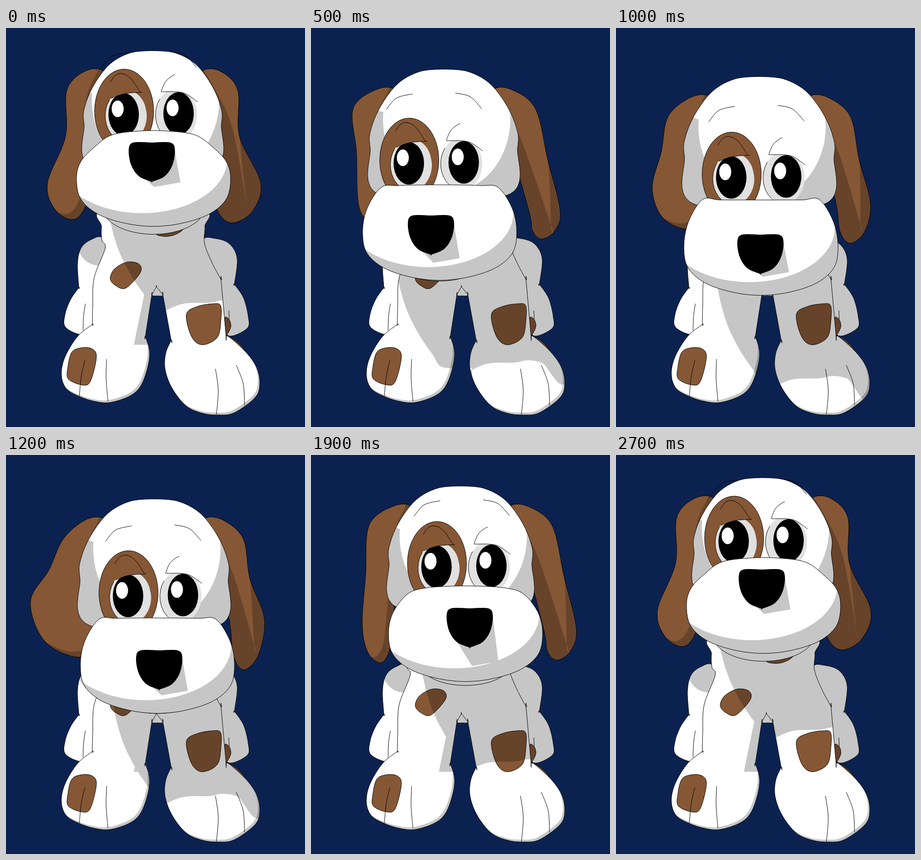
Animation of 648x864 px, one loop 3 s. Source, as an HTML page with a canvas:

```html
<!DOCTYPE html>
<html lang="en">
<head>
<meta charset="utf-8">
<title>Puppy</title>
<style>
html, body { margin: 0; width: 100%; height: 100%; overflow: hidden; background: #0b2250; }
canvas { display: block; }
</style>
</head>
<body>
<canvas width="648" height="864"></canvas>
<script>
const ctx = document.querySelector('canvas').getContext('2d');
const NIGHT = '#0b2250', WHITE = '#fff', GRAY = '#c6c6c6', BROWN = '#855735', DARK = '#67432a';
const SHADE = 'rgba(0,0,0,.224)';

const mix = (a, b, t) => a.map((v, i) => v + (b[i] - v) * t);

// Linear blend between the two keys around the step
function at(keys, step) {
  const times = Object.keys(keys).map(Number);
  const next = times.find(t => t >= step) ?? times[times.length - 1];
  const prev = times.filter(t => t < step).pop() ?? next;
  return next === prev ? keys[next] : mix(keys[prev], keys[next], (step - prev) / (next - prev));
}

// Catmull-Rom curve through [x, y] points; a doubled point makes a corner
function curve(points, closed = true) {
  const n = points.length, path = new Path2D();
  const pt = i => points[closed ? (i + n) % n : Math.max(0, Math.min(n - 1, i))];
  path.moveTo(...points[0]);
  for (let i = 0; i < (closed ? n : n - 1); i++) {
    const [a, b, c, d] = [pt(i - 1), pt(i), pt(i + 1), pt(i + 2)];
    path.bezierCurveTo(b[0] + (c[0] - a[0]) / 6, b[1] + (c[1] - a[1]) / 6,
      c[0] - (d[0] - b[0]) / 6, c[1] - (d[1] - b[1]) / 6, ...c);
  }
  return path;
}
const pts = text => text.split(' ').map(p => p.split(',').map(Number));
const mirrored = half => [...half, ...half.map(([x, y]) => [-x, y]).reverse()];
const shifted = (points, dx, dy) => points.map(([x, y]) => [x + dx, y + dy]);

function ellipse(x, y, rx, ry) {
  const path = new Path2D();
  path.ellipse(x, y, rx, ry, 0, 0, 2 * Math.PI);
  return path;
}
function outside(path, dx, dy) {
  const rest = new Path2D();
  rest.rect(0, 0, 648, 864);
  rest.addPath(path, new DOMMatrix([1, 0, 0, 1, dx, dy]));
  return rest;
}
function fill(path, color, rule) {
  ctx.fillStyle = color;
  ctx.fill(path, rule);
}
function within(path, draw) {
  ctx.save();
  ctx.clip(path);
  draw();
  ctx.restore();
}
function moved(dx, dy, draw) {
  ctx.save();
  ctx.translate(dx, dy);
  draw();
  ctx.restore();
}
function shape(path, color, inside) {
  fill(path, color);
  if (inside) within(path, inside);
  ctx.stroke(path);
}
const line = points => ctx.stroke(curve(points, false));

// Body
const rearLeft = curve(pts('210,455 185,458 163,476 155,510 158,562 158,562 140,588 128,620 129,648 165,664 187,645 240,500'));
const rearRight = curve(pts('425,460 455,456 485,468 501,500 495,555 495,555 515,585 525,625 523,650 485,667 470,640 420,520'));
const body = curve(pts('214,395 207,430 208,460 215,477 191,541 188,600 187,642 187,642 155,668 128,712 120,750 130,780 157,797 ' +
  '190,808 225,811 268,797 292,775 307,735 311,700 302,668 302,668 316,578 316,578 326,560 326,560 340,578 340,578 ' +
  '358,676 358,676 346,705 345,740 360,780 390,818 425,834 460,838 495,833 540,800 550,770 543,735 520,702 485,670 ' +
  '477,668 477,668 466,545 466,545 445,505 430,465 431,430 424,395'));
const bodySpots = [
  '226,543 235,522 262,507 288,511 291,530 260,563 238,558',
  '391,620 415,603 450,597 465,601 466,630 458,670 425,686 402,668',
  '134,735 142,703 160,693 185,694 196,712 183,765 165,773 135,760'
].map(s => curve(pts(s)));
const sideSpots = ['474,628 484,632 487,648 476,665', '486,670 502,680 517,698 500,690'].map(s => curve(pts(s)));
const chinSpot = curve(pts('325,443 340,451 362,449 382,438 390,420 350,412'));
const belly = curve(pts('314,560 316,578 328,580 341,578 341,560'));
const toes = ['171,720 163,755 159,797', '218,717 217,760 221,808', '454,738 460,785 456,837', '499,730 514,770 517,817'].map(pts);
const rearToes = ['172,597 168,625 167,655', '483,612 484,640'].map(pts);
const chestEdge = pts('222,330 222,395 240,470 268,530 300,578 322,605');
const pawEdge = pts('325,625 344,613 385,597 440,595 470,590 500,595 560,615');

// The shadow of the head slides down the chest and legs as the nose sinks
function headShadow(noseX, noseY) {
  const drop = .82 * noseY;
  const chest = shifted(chestEdge, .65 * noseX, drop);
  const shadow = curve([...chest, [345, 605 + drop], [345, 605 + drop], [345, 300], [345, 300]]);
  shadow.addPath(curve([...shifted(pawEdge, 0, drop), [580, 300], [325, 300], [325, 300]]));
  shadow.addPath(new Path2D('M300 575L277 686L318 686L330 575Z'));
  return shadow;
}

function drawBody(noseX, noseY) {
  shape(rearLeft, WHITE, () => fill(ellipse(200, 462, 46, 52), SHADE));
  shape(rearRight, GRAY);
  rearToes.forEach(line);
  sideSpots.forEach(s => shape(s, DARK));
  shape(belly, GRAY);
  shape(body, WHITE, () => {
    bodySpots.forEach(s => shape(s, BROWN));
    fill(headShadow(noseX, noseY), SHADE);
    const ground = new Path2D();
    ground.rect(0, 690, 648, 174);
    within(ground, () => fill(outside(body, -4, -5), SHADE, 'evenodd'));
  });
  toes.forEach(line);
  shape(chinSpot, DARK);
}

// Ears: x, y of the outermost point, x, y of the lowest point, inward bend
const leftRest = [90, 335, 143, 415, 24], rightRest = [552, 335, 490, 422, 28];
const leftEar = {
  0: leftRest, 5: [101, 365, 140, 424, 3], 8: [104, 375, 148, 433, 0], 12: [53, 318, 160, 438, 5],
  16: [70, 400, 108, 468, 5], 19: [111, 365, 150, 450, 0], 27: leftRest
};
const rightEar = {
  0: rightRest, 5: [540, 395, 500, 457, 0], 8: [543, 405, 500, 467, -5], 12: [560, 355, 515, 465, 11],
  16: [533, 380, 495, 463, 0], 19: [575, 375, 533, 444, 0], 21: [597, 350, 560, 415, 10], 24: rightRest
};

function drawEar(side, x, y, [outX, outY, lowX, lowY, bend]) {
  const near = (dx, dy) => [x + side * dx, y + dy];
  const out = [outX, outY], low = [lowX, lowY], inn = [lowX - .7 * (outX - lowX), outY];
  const round = p => [p[0] + .29 * (lowX - p[0]), p[1] + .71 * (lowY - p[1])];
  const shoulder = near(198 - bend / 2, 85);
  const middle = mix(near(198, 85), out, .5);
  middle[0] -= side * bend;
  const top = near(143, 43);
  const ear = curve([near(105, 50), top, shoulder, middle, out, round(out), low, round(inn), inn, near(130, 120)]);
  if (side < 0) {
    shape(ear, BROWN, () => fill(outside(ear, -14, -12), SHADE, 'evenodd'));
  } else {
    const tip = mix(out, low, .5);
    const light = curve([near(105, 30), top, shoulder, middle, tip, tip, near(172, 165), near(130, 75)]);
    shape(ear, DARK, () => fill(light, BROWN));
  }
}

// Head parts, laid out for the level pose
const skullHalf = pts('0,0 50,5 95,29 130,73 152,122 155,165 132,265');
const nose = curve(shifted(mirrored(pts('0,0 40,0 50,15 45,48 28,73 0,85')), 344, 332));
const eyes = [
  { x: 272, y: 242, white: 5, lid: pts('222,228 245,207 275,197 312,194') },
  { x: 391, y: 240, white: -5, lid: pts('340,194 354,193 400,195 432,215') }
];
const brows = ['243,172 255,157 270,154 288,165 308,194', '353,193 362,172 375,160 383,156'].map(pts);
const forehead = ['223,133 245,108 280,99', '373,97 405,105 430,131'].map(pts);

function drawEye({ x, y, white, lid }) {
  const open = curve(lid, false);
  open.lineTo(x + 70, y + 90);
  open.lineTo(x - 70, y + 90);
  within(open, () => {
    fill(ellipse(x + white, y + 3, 45, 56), '#e1e1e1');
    fill(ellipse(x, y, 33, 46), '#000');
    ctx.beginPath();
    ctx.ellipse(x + white, y + 3, 45, 56, 0, 2.2, 3.8);
    ctx.stroke();
  });
  line(lid.slice(1));
  fill(ellipse(x - 13, y - 12, 13, 18), WHITE);
}

// A raised muzzle shows a domed top, a lowered one a flat top
function drawMuzzle(tilt) {
  const dome = 18 - 22 * tilt;
  const muzzle = curve(mirrored([[30, 0], [90, dome * .25], [127, dome], [158, 50 + dome / 2],
    [167, 105], [156, 150], [112, 184], [37, 204]]));
  shape(ellipse(0, 165, 100 - 15 * tilt, 50 - 12 * tilt), GRAY);
  shape(muzzle, GRAY, () => fill(ellipse(-25, 60, 185, 118), WHITE));
  return muzzle;
}

// Skull offset, then how far the nose swings beyond it
const pose = {
  0: [-6, -18, -22, -66], 5: [-36, 22, -48, 52], 8: [-24, 48, -26, 92], 12: [-3, 28, -9, 63],
  16: [-1, 12, -3, 32], 19: [0, 0, 0, 0], 24: [-6, -18, -22, -66]
};

function drawHead(step, dx, dy, turnX, turnY) {
  const tilt = turnY / 92, size = 1 + .055 * tilt;
  const turned = (kx, ky, draw) => moved(dx + kx * turnX, dy + ky * turnY, draw);
  drawEar(-1, 324 + dx, 67 + dy, at(leftEar, step));
  drawEar(1, 324 + dx, 67 + dy, at(rightEar, step));

  const skull = curve(shifted(mirrored(skullHalf.map(p => p.map(v => v * size))), 324 + dx, 67 + dy));
  shape(skull, WHITE, () => {
    fill(outside(ellipse(330, 175, 138, 160), dx, dy), SHADE, 'evenodd');
    fill(ellipse(300 + dx, 100 + dy, 180, 75), WHITE);
    turned(.5, .56, () => shape(ellipse(273, 235, 64, 91), BROWN));
  });
  turned(.5, .56, () => {
    eyes.forEach(drawEye);
    brows.forEach(line);
  });
  turned(.5, .42, () => forehead.forEach(line));

  let muzzle;
  const muzzleX = 335 + dx + .42 * turnX, muzzleY = 284 + dy + .65 * turnY;
  moved(muzzleX, muzzleY, () => { muzzle = drawMuzzle(tilt); });
  const placed = new Path2D();
  placed.addPath(muzzle, new DOMMatrix([1, 0, 0, 1, muzzleX, muzzleY]));
  const reach = 332 + 125 - 40 * Math.abs(tilt);
  within(placed, () => turned(1, 1, () =>
    fill(new Path2D(`M394 350L406 ${reach - 10}L349 ${reach}L309 392Z`), GRAY)));
  turned(1, 1, () => fill(nose, '#000'));
}

function frame(now) {
  const step = Math.min(27, Math.floor(now % 3000 / 100));
  const [dx, dy, turnX, turnY] = at(pose, step);
  ctx.fillStyle = NIGHT;
  ctx.fillRect(0, 0, 648, 864);
  ctx.strokeStyle = '#000';
  ctx.lineWidth = 1;
  drawBody(dx + turnX + 28, dy + turnY + 84);
  drawHead(step, dx, dy, turnX, turnY);
  requestAnimationFrame(frame);
}
requestAnimationFrame(frame);
</script>
</body>
</html>
```
